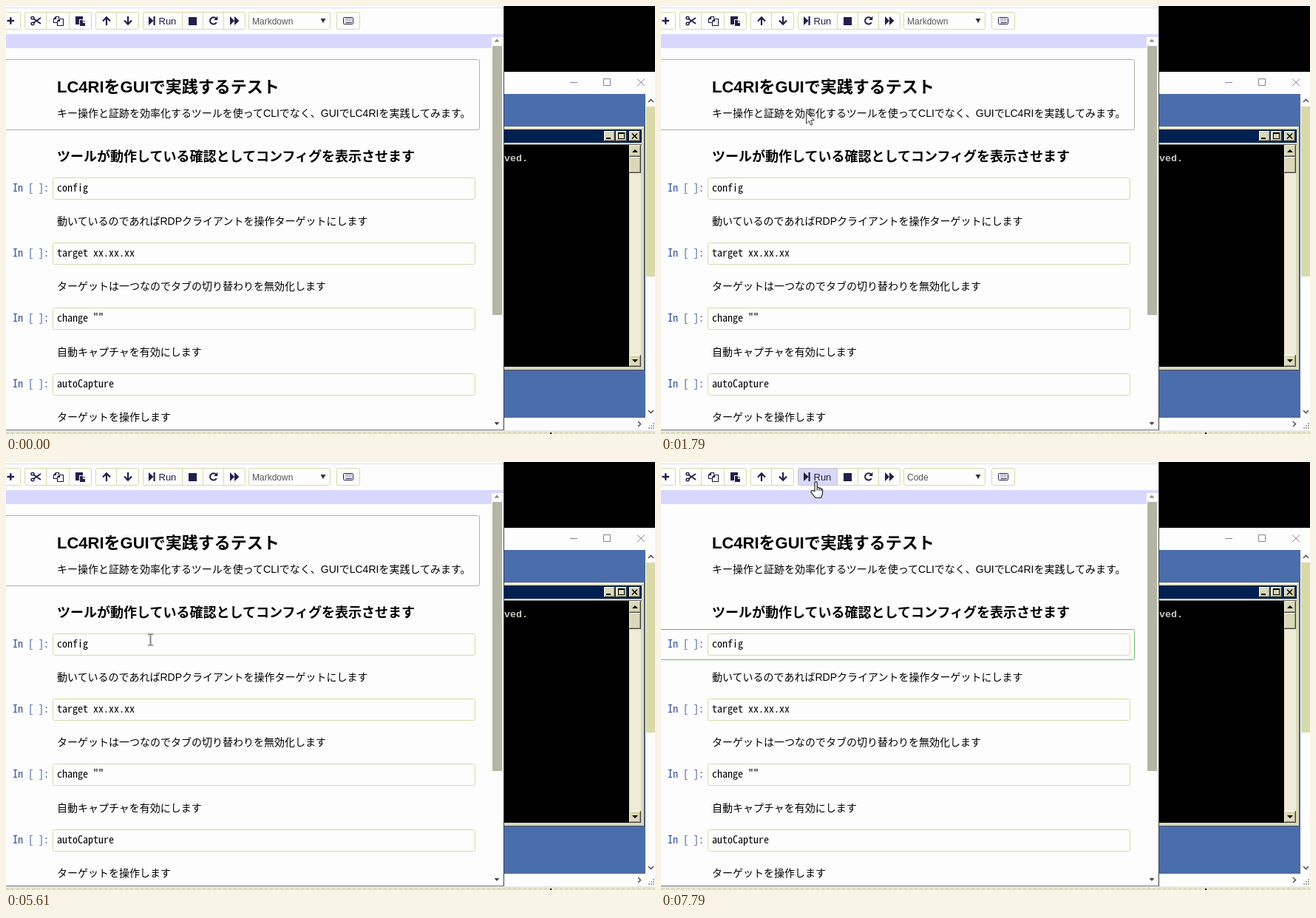
Recreate the animation shown at these times as an HTML page. Size 878x579 px, loop 8000 ms.

```html
<!DOCTYPE html>
<html lang="ja">
<head>
<meta charset="utf-8">
<title>Notebook</title>
<style>
html, body { margin: 0; width: 100%; height: 100%; overflow: hidden; background: #fdfdfd; }
svg { display: block; width: 100vw; height: 100vh; }
text { white-space: pre; }
.sans { font-family: "Liberation Sans", "Noto Sans CJK JP", "Noto Sans CJK", sans-serif; }
.term { font: bold 13.33px "Liberation Mono", monospace; }
</style>
</head>
<body>
<svg id="stage" viewBox="0 0 878 579"></svg>
<script>
const DURATION = 8000;
const INK = '#202048', CREAM = '#d9d9aa', LAVENDER = '#d8d8ff', PAPER = '#fdfdfd';

// A half-width face keeps code on its 7px grid at 14px.
const pen = document.createElement('canvas').getContext('2d');
pen.font = '14px "Noto Sans Mono CJK JP", "Liberation Mono", monospace';
const halfWidth = pen.measureText('x').width < 7.5;
const MONO = halfWidth
  ? `font-family='"Noto Sans Mono CJK JP", monospace' font-size="14"`
  : `font-family='"Liberation Mono", monospace' font-size="11.667"`;

const rect = (x, y, w, h, fill, extra = '') =>
  `<rect x="${x}" y="${y}" width="${w}" height="${h}" fill="${fill}" ${extra}/>`;
const frame = (x, y, w, h, stroke, r = 2, fill = 'none') =>
  rect(x + .5, y + .5, w - 1, h - 1, fill, `stroke="${stroke}" rx="${r}"`);
const shape = (d, fill = INK) => `<path d="${d}" fill="${fill}"/>`;
const line = (d, stroke = INK, width = 1) =>
  `<path d="${d}" fill="none" stroke="${stroke}" stroke-width="${width}"/>`;
const sans = (x, y, size, str, extra = '') =>
  `<text class="sans" x="${x}" y="${y}" font-size="${size}" ${extra}>${str}</text>`;
const mono = (x, y, str, fill = '#000') =>
  `<text x="${x}" y="${y}" ${MONO} fill="${fill}">${str}</text>`;
const group = (id, body) => `<g id="${id}">${body}</g>`;

function codeCell(y, code) {
  return frame(63, y, 572, 30, CREAM) + mono(9, y + 19, 'In [ ]:', '#30509f') + mono(69, y + 19, code);
}

function toolbar() {
  const groups = [[-10, 20], [25, 55, 86, 116], [121, 150, 180], [185, 239, 267, 295, 324], [447, 479]];
  const boxes = groups.map(edges => {
    const [left, right] = [edges[0], edges.at(-1)];
    return frame(left, 8, right - left, 24, CREAM) +
      edges.slice(1, -1).map(x => line(`M${x - .5} 9V31`, CREAM)).join('');
  }).join('');
  const keys = [17.5, 20, 22.5].map((y, row) =>
    line(`M459.5 ${y}H468`, INK, 1).replace('/>', row < 2 ? ' stroke-dasharray="1.2 1"/>' : '/>')).join('');
  return rect(0, 2, 673, 1, LAVENDER) + rect(0, 38, 673, 19, LAVENDER) + boxes +
    group('hover', frame(185, 8, 54, 24, '#c8c8c8', 2, '#d8d8f8')) +
    line('M1.5 20H11M6.3 15.2V24.8', INK, 2.4) +
    line('M37 17L47 24M37 23L47 16', INK, 1.8) +
    line('M34 16.2a2 1.7 0 1 0 4 0a2 1.7 0 1 0-4 0M34 24a2 1.7 0 1 0 4 0a2 1.7 0 1 0-4 0', INK, 1.4) +
    line('M69.5 22.5H64.5V17.5L67.5 14.5H71.5V17M67.5 14.5V17.5H64.5M69.5 20.5L72.5 17.5H77.5V26.5H69.5ZM72.5 17.5V20.5H69.5', INK, 1.2) +
    shape('M94 14h10v4h-5v7h-5zM100 19h4v4h3v4h-7zM105 19l2 2.5h-2z') +
    line('M136 26V16M131 20.5L136 15.3L141 20.5', INK, 2.2) +
    line('M165 14V24M160 19.5L165 24.7L170 19.5', INK, 2.2) +
    shape('M193 14l6.5 6v-6h2.2v12h-2.2v-6l-6.5 6z') +
    sans(206.5, 25, 13, 'Run', `fill="${INK}"`) +
    rect(247, 15, 11, 11, INK) +
    line('M284.8 22.3A4.7 4.7 0 1 1 284.3 16.8', INK, 2) + shape('M286.3 13.8v5.2h-5.2z') +
    shape('M303 14l6 6v-6l6.5 6l-6.5 6v-6l-6 6z') +
    frame(328, 8, 111, 24, CREAM) + shape('M425.5 17h7l-3.5 6z', '#333') +
    group('markdown', sans(333, 25, 12, 'Markdown', 'fill="#555"')) +
    group('code', sans(333, 25, 12, 'Code', 'fill="#555"')) +
    frame(456, 15, 14, 10, INK, 1) + keys;
}

function notebook() {
  const body = (y, str) => sans(69, y, 14, str);
  return rect(0, 0, 673, 574, PAPER) + toolbar() +
    rect(657, 42, 16, 532, PAPER) + rect(658, 54, 13, 364, '#b5b5a6') +
    shape('M660.5 48.5h7l-3.5-4z', '#888') + shape('M660.5 563h7l-3.5 4z', '#444') +
    group('selected', frame(-10, 72, 651, 96, '#b0b0a4')) +
    group('editing', frame(-10, 226, 651, 42, '#66bb6a')) +
    group('editingPart', rect(0, 226, 214, 1, '#66bb6a')) +
    sans(69, 117, 22, 'LC4RIをGUIで実践するテスト', 'font-weight="bold"') +
    body(150, 'キー操作と証跡を効率化するツールを使ってCLIでなく、GUIでLC4RIを実践してみます。') +
    sans(69, 210, 18, 'ツールが動作している確認としてコンフィグを表示させます', 'font-weight="bold"') +
    codeCell(232, 'config') +
    body(296, '動いているのであればRDPクライアントを操作ターゲットにします') +
    codeCell(320, 'target xx.xx.xx') +
    body(384, 'ターゲットは一つなのでタブの切り替わりを無効化します') +
    codeCell(408, 'change ""') +
    body(473, '自動キャプチャを有効にします') +
    codeCell(497, 'autoCapture') +
    body(561, 'ターゲットを操作します') +
    group('caret', rect(112, 239, 1, 17, '#222')) +
    group('caretPart', rect(112, 239, 1, 8, '#222'));
}

function bevel(x, y, w, h) {
  return rect(x, y, w, h, '#404040') + rect(x, y, w - 1, h - 1, '#fff') +
    rect(x + 1, y + 1, w - 2, h - 2, '#9a9a80') + rect(x + 1, y + 1, w - 3, h - 3, '#dad8b8');
}

function remoteDesktop() {
  return rect(673, 0, 205, 89, '#000') + rect(673, 89, 205, 485, PAPER) +
    line('M763 103.5H773M808.5 98.5H817.5V107.5H808.5ZM854 98.5L864 108M864 98.5L854 108', '#85809a') +
    rect(674, 119, 191, 438, '#4a6dab') +
    rect(866, 136, 12, 230, CREAM) +
    line('M869 130L872.5 126.5L876 130M869 547L872.5 550.5L876 547M855 562L858.5 565.5L855 569', '#555', 1.6) +
    [[875, 564], [872, 567], [875, 567], [869, 570], [872, 570], [875, 570]]
      .map(([x, y]) => rect(x, y, 2, 2, '#aaa')).join('') +
    rect(674, 163, 190, 330, '#505050') + rect(674, 163, 189, 329, '#dad8b8') +
    rect(674, 164, 188, 1, '#fff') + rect(674, 167, 186, 18, '#002050') +
    [809, 825, 843].map(x => bevel(x, 169, 15, 14)).join('') +
    rect(812, 178, 6, 2, '#000') +
    frame(828, 171, 9, 9, '#000', 0) + rect(828, 171, 9, 2, '#000') +
    line('M847 172.5L854 179.5M854 172.5L847 179.5', '#000', 1.7) +
    rect(674, 187, 186, 1, '#666') + rect(674, 188, 169, 300, '#000') +
    rect(843, 188, 16, 300, '#eeecd6') +
    bevel(843, 188, 16, 16) + bevel(843, 204, 16, 22) + bevel(843, 472, 16, 16) +
    shape('M847 198h8l-4-4z', '#000') + shape('M847 478h8l-4 4z', '#000') +
    '<text class="term" x="674" y="210" fill="#c8c8c0">ved.</text>';
}

function edges() {
  return rect(0, 574, 878, 5, '#e6e6e6') + rect(0, 573, 674, 1, '#77777a') +
    line('M0 577.5H878', '#dada9c', 2).replace('/>', ' stroke-dasharray="4 3"/>') +
    rect(736, 577, 2, 2, '#000') + rect(673, 0, 1, 574, '#404040');
}

const pointers = {
  arrow: `<path d="M.5.5V16L4.1 12.6L6.7 18.2L9 17.2L6.5 11.7H11.4Z" fill="#fdfdfd" stroke="#333"/>`,
  beam: line('M-3.5-7.5H-.5M.5-7.5H3.5M0-7V7M-3.5 7.5H-.5M.5 7.5H3.5', '#222', 1.1),
  beamPart: line('M0 1.5V7M-3.5 7.5H3.5', '#222', 1.1),
  hand: `<path d="M6 13.5V2.3a1.6 1.6 0 0 1 3.2 0V8.5q2.6-.8 2.8.9q2.3-.6 2.6 1q1.9-.2 1.9 1.7v5l-2 5.4H7L1 14.8q-.6-2.5 1.8-2.1Z
    M9.2 8.5V12.5M12 9.4V12.8M14.6 10.4V13" fill="#fff" stroke="#222" stroke-width="1.2" stroke-linejoin="round"/>`
};

const stage = document.getElementById('stage');
stage.innerHTML = remoteDesktop() + notebook() + edges() +
  group('pointer', Object.entries(pointers).map(([id, art]) => group(id, art)).join(''));

// Each value holds until the next time in the table.
function hold(id, prop, table) {
  const keys = table.map(([t, value]) => ({ offset: t / DURATION, [prop]: value, easing: 'steps(1, end)' }));
  keys.push({ offset: 1, [prop]: table.at(-1)[1] });
  document.getElementById(id).animate(keys, { duration: DURATION, iterations: Infinity });
}
const showBetween = (id, from, to = DURATION) =>
  hold(id, 'opacity', [
    ...(from > 0 ? [[0, 0]] : []), [from, 1], ...(to < DURATION ? [[to, 0]] : [])
  ]);

showBetween('markdown', 0, 6050);
showBetween('selected', 0, 6050);
showBetween('code', 6050);
showBetween('editingPart', 6050, 6160);
showBetween('caretPart', 6050, 6160);
showBetween('editing', 6160);
showBetween('caret', 6160, 6700);
showBetween('hover', 7790);

const track = [
  [0, 'none', 505, 447], [500, 'arrow', 505, 447], [610, 'arrow', 364, 322], [710, 'arrow', 250, 228],
  [820, 'arrow', 193, 180], [930, 'arrow', 191, 170], [1040, 'arrow', 191, 164], [1140, 'arrow', 192, 160],
  [1250, 'arrow', 192, 159], [1360, 'arrow', 193, 157], [1580, 'arrow', 194, 152], [1690, 'arrow', 195, 147],
  [1790, 'arrow', 196, 143], [2570, 'arrow', 202, 149], [2680, 'arrow', 206, 155], [4520, 'arrow', 205, 163],
  [4630, 'arrow', 203, 193], [4740, 'arrow', 201, 226], [4850, 'arrow', 203, 242], [5180, 'arrow', 200, 244],
  [5610, 'beam', 195.5, 240.5], [5720, 'beam', 205.5, 245], [6050, 'beamPart', 205.5, 245],
  [6160, 'beam', 205.5, 245], [6920, 'beam', 206.5, 190], [7030, 'beam', 205.5, 128], [7140, 'beam', 204.5, 80],
  [7250, 'arrow', 212, 54], [7360, 'arrow', 219, 40], [7460, 'arrow', 216, 35], [7570, 'arrow', 211, 30],
  [7680, 'hand', 202, 26]
];
hold('pointer', 'transform', track.map(([t, , x, y]) => [t, `translate(${x}px, ${y}px)`]));
for (const id of Object.keys(pointers)) {
  hold(id, 'opacity', track.map(([t, kind]) => [t, kind === id ? 1 : 0]));
}
</script>
</body>
</html>
```
